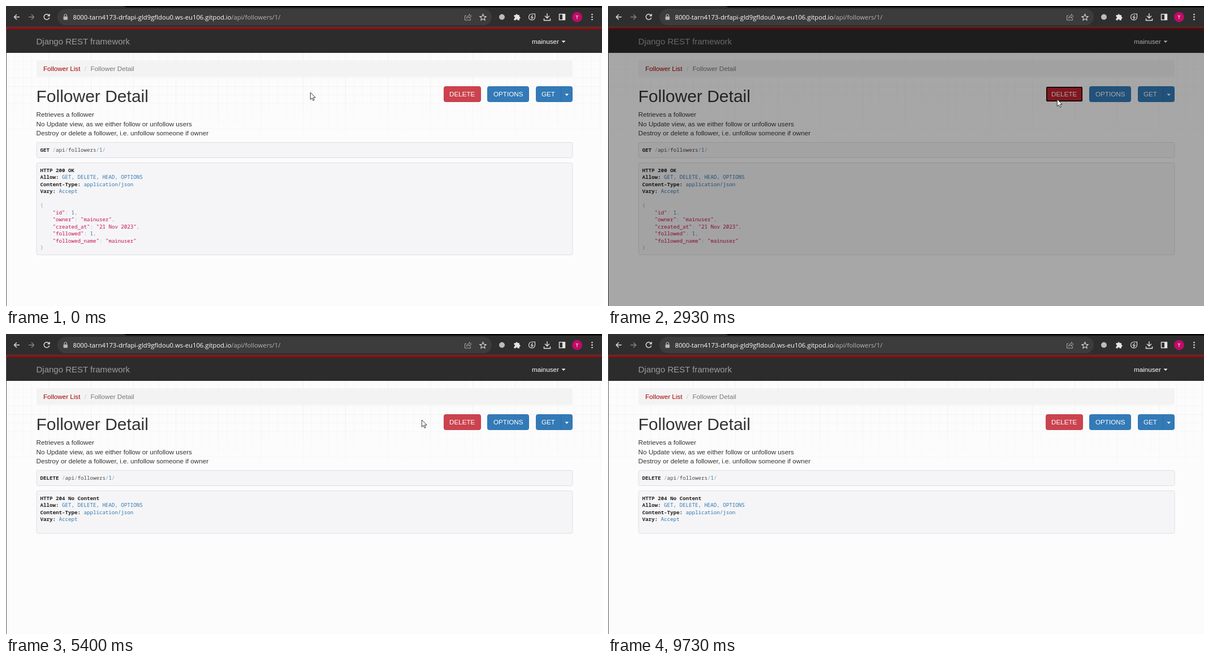
Recreate the animation shown at these times as an HTML page. Size 1054 px wide and 531 px high, loop 9.76 s.

```html
<!DOCTYPE html>
<html lang="en">
<head>
<meta charset="utf-8">
<title>Follower Detail</title>
<style>
  html, body { margin: 0; width: 100%; height: 100%; overflow: hidden; background: #fcfcfc; }
  svg { display: block; width: 100%; height: 100%; }
  text { font: 11.67px "Liberation Sans", Arial, sans-serif; fill: #333; white-space: pre; }
  .url { font: 11.25px "Open Sans", sans-serif; fill: #fff; }
  .path { fill: #b4b4b4; }
  .brand { font-size: 15px; fill: #9d9d9d; }
  .code { font: 9.17px "Noto Sans Mono", monospace; fill: #48484c; }
  .key { font-weight: 700; fill: #222; }
  .lit { fill: #2f76ad; }
  .str { fill: #c9124f; }
  .pun { fill: #93a1a1; }
  .label { fill: #fff; }
  .well { fill: #f5f5f7; stroke: #e0e0e4; }
  .danger { fill: #cb434e; stroke: #c9404b; }
  .danger.hover { fill: #c02c38; stroke: #b52834; }
  .danger.pressed { fill: #c0222f; stroke: #fff; }
  .primary { fill: #337ab7; stroke: #3278b4; }
  .icon { fill: none; stroke: #e3e3e3; stroke-width: 1.4; }
  .solid { fill: #e3e3e3; }
  #modal { filter: drop-shadow(0 4px 6px rgba(0, 0, 0, .5)); }
</style>
</head>
<body>
<svg viewBox="0 0 1054 531" preserveAspectRatio="none">
  <defs>
    <pattern id="minor" width="15" height="15" patternUnits="userSpaceOnUse" y="7">
      <path d="M.5 0V15M0 .5H15" stroke="#f7f7fa" fill="none"/>
    </pattern>
    <pattern id="major" width="75" height="75" patternUnits="userSpaceOnUse" y="67">
      <path d="M.5 0V75M0 .5H75" stroke="#f2f2f7" fill="none"/>
    </pattern>
    <linearGradient id="fade" x2="0" y2="1">
      <stop offset=".4" stop-color="#fcfcfc" stop-opacity="0"/>
      <stop offset="1" stop-color="#fcfcfc"/>
    </linearGradient>
  </defs>

  <g id="page">
    <rect width="1054" height="531" fill="#fcfcfc"/>
    <rect y="83" width="1054" height="180" fill="url(#minor)"/>
    <rect y="83" width="1054" height="180" fill="url(#major)"/>
    <rect y="83" width="1054" height="181" fill="url(#fade)"/>
    <rect y="37" width="1054" height="46" fill="#2c2c2c"/>
    <rect y="37" width="1054" height="4" fill="#a30000"/>
    <text class="brand" x="53.5" y="67.8">Django REST framework</text>
    <text class="label" x="930" y="66.5">mainuser</text>
    <path d="M982.5 61.5h7l-3.5 3.5z" fill="#fff"/>

    <rect x="54" y="96" width="948" height="29.5" rx="3" fill="#f3f3f3"/>
    <text x="66" y="115" style="fill:#a30000">Follower List</text>
    <text x="139" y="115" style="fill:#ccc">/</text>
    <text x="149.5" y="115" style="fill:#777">Follower Detail</text>

    <text x="53.5" y="169.5" style="font-size:30px">Follower Detail</text>
    <text x="53.5" y="195.5">Retrieves a follower</text>
    <text x="53.5" y="212.5">No Update view, as we either follow or unfollow users</text>
    <text x="53.5" y="229">Destroy or delete a follower, i.e. unfollow someone if owner</text>

    <rect id="deleteButton" class="danger" x="774.5" y="142.5" width="65" height="27" rx="3"/>
    <rect id="focusRing" x="775.75" y="143.75" width="62.5" height="24.5" rx="2" fill="none" stroke="#000" stroke-width="1.5"/>
    <text class="label" x="784" y="160.2">DELETE</text>
    <rect class="primary" x="851.5" y="142.5" width="73" height="27" rx="3"/>
    <text class="label" x="862" y="160.2">OPTIONS</text>
    <rect class="primary" x="937.5" y="142.5" width="64" height="27" rx="3"/>
    <path d="M981.5 142.5v27" stroke="#2e6da4"/>
    <text class="label" x="947" y="160.2">GET</text>
    <path d="M988.5 155.5h6.5l-3.25 3.5z" fill="#fff"/>

    <rect class="well" x="54" y="241.5" width="948" height="27" rx="3"/>
    <rect id="responseBox" class="well" x="54" y="277.5" width="948" height="163" rx="3"/>
    <g id="before"></g>
    <g id="after"></g>
    <path d="M.5 37V531" stroke="#555"/>
  </g>

  <rect id="backdrop" y="37" width="1054" height="494"/>

  <g id="modal">
    <rect x="279" y="63" width="498" height="111.5" rx="4" fill="#fff"/>
    <path d="M279 121.5h498" stroke="#e8e8e8"/>
    <text x="353" y="97" style="font-size:15px">Are you sure you want to delete this Follower Detail?</text>
    <rect x="644.5" y="134.5" width="56" height="27" rx="3" fill="#fff" stroke="#ccc"/>
    <text x="654.5" y="152">Cancel</text>
    <rect id="confirmButton" class="danger" x="706.5" y="134.5" width="54" height="27" rx="3"/>
    <text class="label" x="716" y="152">Delete</text>
  </g>

  <g id="browser">
    <rect width="1054" height="37.5" fill="#2e2e2e"/>
    <path d="M206 0q5 0 6 2.5H1054V0z"/>
    <path d="M0 37.5H1054" stroke="#555" stroke-width=".7"/>
    <rect x="91" y="5" width="768" height="29" rx="14.5" fill="#3c3c3c"/>
    <path class="icon" d="M24 19.5H14.5m4.5-4.5l-4.5 4.5l4.5 4.5"/>
    <path class="icon" d="M40 19.5h9.5m-4.5-4.5l4.5 4.5l-4.5 4.5" style="stroke:#858585"/>
    <path class="icon" d="M76 16.5a4.8 4.8 0 1 0 .7 4M77 14v3.5h-3.5"/>
    <rect x="101.5" y="18.5" width="7.5" height="6" rx="1" fill="#b8b8b8"/>
    <path class="icon" d="M103 18.5v-1.500a2.25 2.25 0 0 1 4.5 0v1.5" style="stroke:#b8b8b8;stroke-width:1.1"/>
    <text class="url" x="118.5" y="23.7">8000-tarn4173-drfapi-gld9gfldou0.ws-eu106.gitpod.io<tspan class="path">/api/followers/1/</tspan></text>
    <path class="icon" d="M814 17h-2.5v8h10v-3M814.500 22q.5-5 5-5.2v-2.5l3.5 3.7l-3.5 3.5v-2.2q-3 0-5 2.7z" style="stroke:#aaa;stroke-width:1"/>
    <path class="icon" d="M843.500 14.5l1.6 3.7l4 .4l-3 2.7l.9 3.9l-3.5-2.1l-3.5 2.1l.9-3.9l-3-2.7l4-.4z" style="stroke-width:1.1"/>
    <circle cx="877" cy="19.5" r="5" fill="#bbb"/>
    <path class="solid" d="M898.500 16h3a1.7 1.7 0 1 1 3.4 0h3v3a1.7 1.7 0 1 1 0 3.4v2.8h-3.2a1.6 1.6 0 1 0-3.2 0h-3v-3.2a1.6 1.6 0 1 0 0-3.2z"/>
    <path class="icon" d="M935.500 14v5.5a5.5 5.5 0 1 1-5.5-5.5zM931.500 16l-3 4h3.5l-3 3.5" style="stroke-width:1.2"/>
    <path class="icon" d="M957 13v8m-4-3.5l4 4l4-4M951.500 22v3.5h11V22"/>
    <rect class="icon" x="978.5" y="14.5" width="10" height="10"/>
    <rect class="solid" x="984" y="14" width="5" height="11"/>
    <circle cx="1010" cy="19.5" r="9" fill="#c00b67"/>
    <text class="label" x="1010" y="23" text-anchor="middle" style="font-size:9.5px">T</text>
    <g class="solid">
      <circle cx="1036.5" cy="15" r="1.3"/>
      <circle cx="1036.5" cy="19.5" r="1.3"/>
      <circle cx="1036.5" cy="24" r="1.3"/>
    </g>
  </g>

  <g id="cursor" fill="#fff" stroke="#222" stroke-width=".9" stroke-linejoin="round">
    <path id="arrow" d="M.3 0V12.5L3.2 9.8L5.2 14.4L7.2 13.5L5.2 9.1H9.2z"/>
    <path id="hand" d="M-1 1q1-1.500 2 0v5l5 1q1.5.5 1.5 2l-1 5h-6l-4-5q0-1.500 1.5-1l1 1z"/>
  </g>
</svg>
<script>
const LOOP = 9760;
const CLICK = 2830, MODAL_IN = 2980, RELOAD = 5400, EXIT = 8850;
const $ = id => document.getElementById(id);
const clamp = v => Math.min(1, Math.max(0, v));
const show = (id, on) => $(id).style.display = on ? '' : 'none';

const headers = ['Allow: GET, DELETE, HEAD, OPTIONS', 'Content-Type: application/json', 'Vary: Accept'];
const body = ['{', '    "id": 1,', '    "owner": "mainuser",', '    "created_at": "21 Nov 2023",',
  '    "followed": 1,', '    "followed_name": "mainuser"', '}'];

const span = (type, text) => `<tspan class="${type}">${text}</tspan>`;
const line = (y, markup) => `<text class="code" x="60.5" y="${y}">${markup}</text>`;
const colorJson = text => text.replace(/("[^"]*")|(\d+)|([{}:,])/g,
  (all, str, num) => span(str ? 'str' : num ? 'lit' : 'pun', all));
const colorHeader = text => text.replace(/^(\S+)(.*)/, (_, key, value) => span('key', key) + span('lit', value));
const colorPath = path => path.replace(/\/|\d/g, c => span(c === '/' ? 'pun' : 'lit', c));

function exchange(method, status, json) {
  const rows = [span('key', 'HTTP ' + status), ...headers.map(colorHeader), '', ...json.map(colorJson)];
  return line(258.3, span('key', method) + ' ' + colorPath('/api/followers/1/')) +
    rows.map((row, i) => line(293.8 + i * 12.48, row)).join('');
}
$('before').innerHTML = exchange('GET', '200 OK', body);
$('after').innerHTML = exchange('DELETE', '204 No Content', []);

// Pointer stops: time, x, y
const stops = [
  [0, 538, 153], [1000, 538, 153], [2230, 759, 165], [2600, 794, 165], [3200, 794, 165],
  [3930, 762, 159], [4500, 735, 152], [5500, 735, 152], [6330, 667, 154], [7000, 667, 154],
  [8230, 484, 117], [EXIT, 468, -20], [LOOP, 468, -20]
];

function pointerAt(t) {
  const i = stops.findIndex(stop => stop[0] > t);
  const [t0, x0, y0] = stops[i - 1], [t1, x1, y1] = stops[i];
  const p = (t - t0) / (t1 - t0), k = p * p * (3 - 2 * p);
  return [x0 + (x1 - x0) * k, y0 + (y1 - y0) * k];
}

function render(t) {
  const reloaded = t >= RELOAD;
  const modalOpen = t >= MODAL_IN && !reloaded;
  const [x, y] = pointerAt(t);

  show('before', !reloaded);
  show('after', reloaded);
  $('responseBox').setAttribute('height', reloaded ? 75.5 : 163);

  $('backdrop').setAttribute('opacity', reloaded ? 0 : .5 * clamp((t - CLICK) / 150));
  show('modal', modalOpen);
  $('modal').setAttribute('opacity', clamp((t - MODAL_IN) / 150));
  const slide = (1 - clamp((t - MODAL_IN) / 300)) ** 2;
  $('modal').setAttribute('transform', `translate(0 ${-28 * slide})`);

  const overDelete = t < CLICK && x >= 774 && x <= 840;
  const overConfirm = modalOpen && t > 3300 && x >= 706 && x <= 761;
  const pressed = t >= CLICK && t < MODAL_IN;
  $('deleteButton').setAttribute('class', 'danger' + (pressed ? ' pressed' : overDelete ? ' hover' : ''));
  show('focusRing', pressed);
  $('confirmButton').setAttribute('class', 'danger' + (overConfirm ? ' hover' : ''));

  const hand = overDelete || overConfirm;
  show('hand', hand);
  show('arrow', !hand);
  show('cursor', t < EXIT);
  $('cursor').setAttribute('transform', `translate(${x} ${y})`);
}

function tick() {
  render(performance.now() % LOOP);
  requestAnimationFrame(tick);
}
tick();
</script>
</body>
</html>
```
